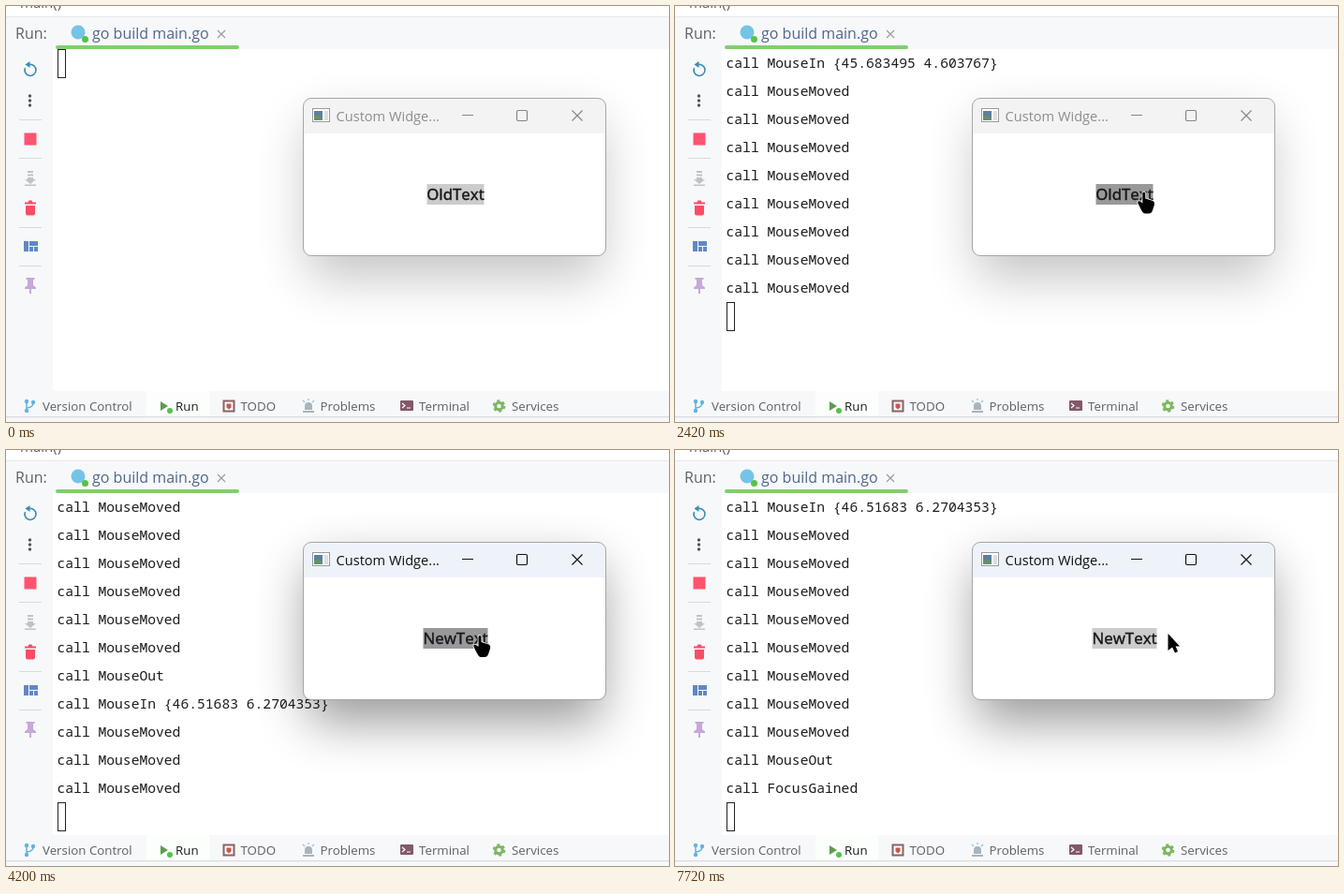
Write an HTML page that moves like this. It is 708 px wide and 444 px high and loops after 8000 ms.

```html
<!DOCTYPE html>
<html lang="en">
<head>
<meta charset="utf-8">
<title>Custom widget events</title>
<style>
  html, body { margin: 0; width: 100%; height: 100%; overflow: hidden; background: #fff; }
  svg { display: block; width: 708px; height: 444px; }
  text { font-family: "Open Sans", "Noto Sans", sans-serif; fill: #5d6068; white-space: pre; }
  .ui { font-size: 16px; }
  .bar text { font-size: 13.3px; }
  .log text { font: 14.67px "Noto Sans Mono", "DejaVu Sans Mono", monospace; fill: #1c1c1c; }
  #label { font: 16.8px "Noto Sans", sans-serif; font-kerning: none; fill: #16161c; stroke: #16161c; stroke-width: .35; text-anchor: middle; }
  .line { fill: none; stroke-width: 1.2; }
  .win text { font-size: 14.6px; fill: #8d8d8d; }
  .win .line { stroke: #868686; }
  .win .head { fill: #f3f3f3; }
  .active text { fill: #111; }
  .active .line { stroke: #111; }
  .active .head { fill: #eef3f9; }
</style>
</head>
<body>
<svg viewBox="0 0 708 444">
  <defs>
    <filter id="blur" x="-50%" y="-80%" width="200%" height="260%"><feGaussianBlur stdDeviation="27"/></filter>
    <clipPath id="frame"><rect x="318" y="98.5" width="322" height="168" rx="8"/></clipPath>
  </defs>

  <rect width="708" height="444" fill="#fff"/>
  <text x="15" y="2" font-size="15">main()</text>
  <rect y="11" width="708" height="1" fill="#e6e8ec"/>
  <rect y="12" width="708" height="34" fill="#f7f8fa"/>
  <rect y="46" width="50" height="365" fill="#f7f8fa"/>

  <!-- run tab -->
  <text class="ui" x="10" y="35">Run:</text>
  <circle cx="77" cy="28" r="7.5" fill="#75c4e8"/>
  <circle cx="84.5" cy="35.5" r="3.5" fill="#55c24a"/>
  <text class="ui" x="92" y="35" style="fill:#4f668c">go build main.go</text>
  <path class="line" d="M226 26l8 8m0-8l-8 8" stroke="#9a9da3"/>
  <rect x="53" y="42" width="196" height="4" rx="2" fill="#80ce70"/>

  <!-- side tools -->
  <path d="M14 121.5h24M14 162.500h24M14 236.5h24M14 277.500h24" stroke="#d6d9de"/>
  <path d="M20.5 66a6 6 0 1 0 4.500-3.500" fill="none" stroke="#3b8db5" stroke-width="1.600"/>
  <path d="M25.500 59v7l-5-3.500z" fill="#3b8db5"/>
  <g fill="#50535a"><circle cx="25.5" cy="96" r="1.7"/><circle cx="25.5" cy="101" r="1.7"/><circle cx="25.5" cy="106" r="1.7"/></g>
  <rect x="19.5" y="135.5" width="13" height="13" fill="#ff5470"/>
  <path d="M23 176h6v2h-6zM23 179.500h6v2h-6zM23 183h6v2h3l-6 5-6-5h3zM20 190.500h12v1.500h-12z" fill="#c2c2c2"/>
  <path d="M20 209.500h3.500l1-2h3l1 2H32v2H20zM21 213h10v8.500q0 2-2 2h-6q-2 0-2-2z" fill="#ff4c66"/>
  <path d="M19 251h5v11h-5zM25 251h9v5h-9zM25 257h4v5h-4zM30 257h4v5h-4z" fill="#6088c6"/>
  <path d="M21.5 290h9v2h-1.500v6l3 2.500v1.500h-5v5h-2v-5h-5v-1.500l3-2.500v-6h-1.500z" fill="#c6a8da"/>

  <!-- bottom bar -->
  <rect y="411" width="708" height="27" fill="#f7f8fa"/>
  <rect x="150" y="411" width="67" height="27" fill="#fcfefc"/>
  <rect y="438" width="708" height="1.5" fill="#d9dbe0"/>
  <rect y="439.5" width="708" height="4.5" fill="#f7f8fa"/>
  <g class="bar">
    <path d="M22 423v8M29 424q0 4-6.500 5" fill="none" stroke="#5fb4e0" stroke-width="1.5"/>
    <g fill="#5fb4e0"><circle cx="22" cy="422" r="2.2"/><circle cx="29" cy="423" r="2.2"/><circle cx="22" cy="432" r="2.2"/></g>
    <text x="39" y="432">Version Control</text>
    <path d="M165 422l8 5-8 5z" fill="#5f9c50"/><circle cx="175" cy="432" r="3" fill="#52c34a"/>
    <text x="181" y="432" style="fill:#17191d">Run</text>
    <rect x="232.5" y="421.5" width="11" height="11" fill="none" stroke="#8a6266" stroke-width="2"/>
    <path d="M235.500 424.500h5v4l-2.500 2-2.500-2z" fill="#c85a50"/>
    <text x="250.5" y="432">TODO</text>
    <path d="M319 431v-4q0-4 4-4t4 4v4zM317 432h12v2h-12z" fill="#a9b4bd"/>
    <path d="M323 419v2M317 421l2 2M329 421l-2 2" stroke="#8fc4e6" stroke-width="1.3"/>
    <text x="335.5" y="432">Problems</text>
    <rect x="421" y="421" width="14" height="11" rx="1" fill="#83586a"/>
    <path d="M423 424l3 2.500-3 2.500M428 429h4" fill="none" stroke="#fff" stroke-width="1.2"/>
    <text x="441" y="432">Terminal</text>
    <circle cx="526.5" cy="427" r="3.8" fill="none" stroke="#7cb860" stroke-width="3"/>
    <circle cx="526.5" cy="427" r="5.8" fill="none" stroke="#7cb860" stroke-width="2" stroke-dasharray="3.04"/>
    <text x="540" y="432">Services</text>
  </g>

  <g class="log" id="log"></g>
  <rect id="caret" x="55.5" width="8" height="30" fill="none" stroke="#222"/>

  <!-- app window -->
  <rect id="shadow" x="322" y="122" width="314" height="168" rx="10" filter="url(#blur)"/>
  <g class="win" id="win">
    <g clip-path="url(#frame)">
      <rect x="318" y="98" width="323" height="169" fill="#fff"/>
      <rect class="head" x="318" y="98" width="323" height="38"/>
    </g>
    <rect x="317.5" y="98.5" width="323" height="168" rx="8.5" fill="none" stroke="#a6a6a6"/>
    <rect x="327.5" y="109.5" width="18" height="14" fill="#fff" stroke="#9a9a9a"/>
    <rect x="329" y="112" width="9" height="10" fill="#5b7fa0"/>
    <path d="M329 122v-4l4-2 5 4v2z" fill="#64916c"/>
    <rect x="340" y="112" width="4" height="10" fill="#dedede"/>
    <text x="352.5" y="122.5">Custom Widge...</text>
    <path class="line" d="M487 116.5h12M604.5 111.5l11 11m0-11l-11 11"/>
    <rect class="line" x="545.5" y="111.5" width="11" height="11" rx="1.5"/>
  </g>
  <rect id="box" y="190" height="22"/>
  <text id="label" x="480" y="206.5"></text>

  <circle id="click" r="15" fill="#ff0" fill-opacity=".47"/>
  <path id="cursor" fill="#000" stroke="#fff" style="paint-order:stroke" stroke-width="1.6"/>
</svg>

<script>
const LOOP = 8000, ROWS = 11, ROW = 30;
const ARROW = 'M0 0V18L4.5 14.5L7.5 20.5L10.5 19L8 13.5H12.5Z';
const HAND = 'M-1.5 1Q0-1 1.5 1V7L8 9Q12 10 11 14L9 20Q8 23 5 23H1Q-1 23-3 19L-6.5 12Q-7 9-4 10L-1.5 12Z';
const $ = id => document.getElementById(id);
const set = (el, attrs) => { for (const k in attrs) el.setAttribute(k, attrs[k]); };

// [first step, last step, number of steps, x, y reached]
const moves = [
  [100, 860, 12, 582, 227],
  [930, 1280, 6, 516, 188],
  [1540, 1620, 2, 504, 196],
  [1690, 1760, 2, 497, 199],
  [2420, 2690, 5, 516, 197],
  [3270, 3670, 7, 506, 198],
  [5470, 5800, 6, 521.5, 197],
  [7650, 7720, 2, 526.5, 196],
];

// console output: time and event
const log = [];
const emit = (name, ...times) => times.forEach(time => log.push([time, 'call ' + name]));
emit('MouseIn {45.683495 4.603767}', 1690);
emit('MouseMoved', 1690, 1690, 1690, 1760, 1760, 1760, 1760, 2420, 2490, 2560);
emit('MouseOut', 2690);
emit('MouseIn {46.51683 6.2704353}', 3540);
emit('MouseMoved', 3540, 3600, 3670, 5470, 5470, 5540, 5540, 5600);
emit('MouseOut', 5740);
emit('FocusGained', 6920);

const rows = Array.from({ length: ROWS }, (_, i) => {
  const row = document.createElementNS('http://www.w3.org/2000/svg', 'text');
  set(row, { x: 54.5, y: 66 + i * ROW });
  $('log').append(row);
  return row;
});

function pointer(t) {
  let x = 674, y = 442;
  for (const [from, to, n, tx, ty] of moves) {
    if (t < from) break;
    const step = Math.min(n, Math.floor((t - from + 4) / ((to - from) / (n - 1))) + 1);
    x += (tx - x) * step / n;
    y += (ty - y) * step / n;
  }
  return [x, y];
}

function draw(t) {
  const shown = log.filter(([time]) => time <= t).map(([, text]) => text).slice(-ROWS);
  rows.forEach((row, i) => row.textContent = shown[i] || '');
  $('caret').setAttribute('y', 46.5 + shown.length * ROW);

  const renamed = t >= 4130;
  const half = renamed ? 34.5 : 30.5;
  const [x, y] = pointer(t);
  const hover = t >= 1500 && x <= 480 + half;
  set($('box'), { x: 480 - half, width: half * 2, fill: hover ? '#999' : '#ccc' });
  $('label').textContent = renamed ? 'NewText' : 'OldText';

  $('win').classList.toggle('active', t >= 4000);
  const focus = Math.max(0, Math.min(1, (t - 3940) / 200));
  $('shadow').setAttribute('opacity', 0.23 + 0.17 * focus);

  const pressed = t >= 3940 && t < 4130 || t >= 5140 && t < 5270;
  set($('click'), { cx: x, cy: y, visibility: pressed ? 'visible' : 'hidden' });
  set($('cursor'), {
    d: hover ? HAND : ARROW,
    transform: `translate(${x} ${y})`,
    visibility: t >= 100 ? 'visible' : 'hidden',
  });
}

function tick() {
  draw(performance.now() % LOOP);
  requestAnimationFrame(tick);
}
tick();
</script>
</body>
</html>
```
